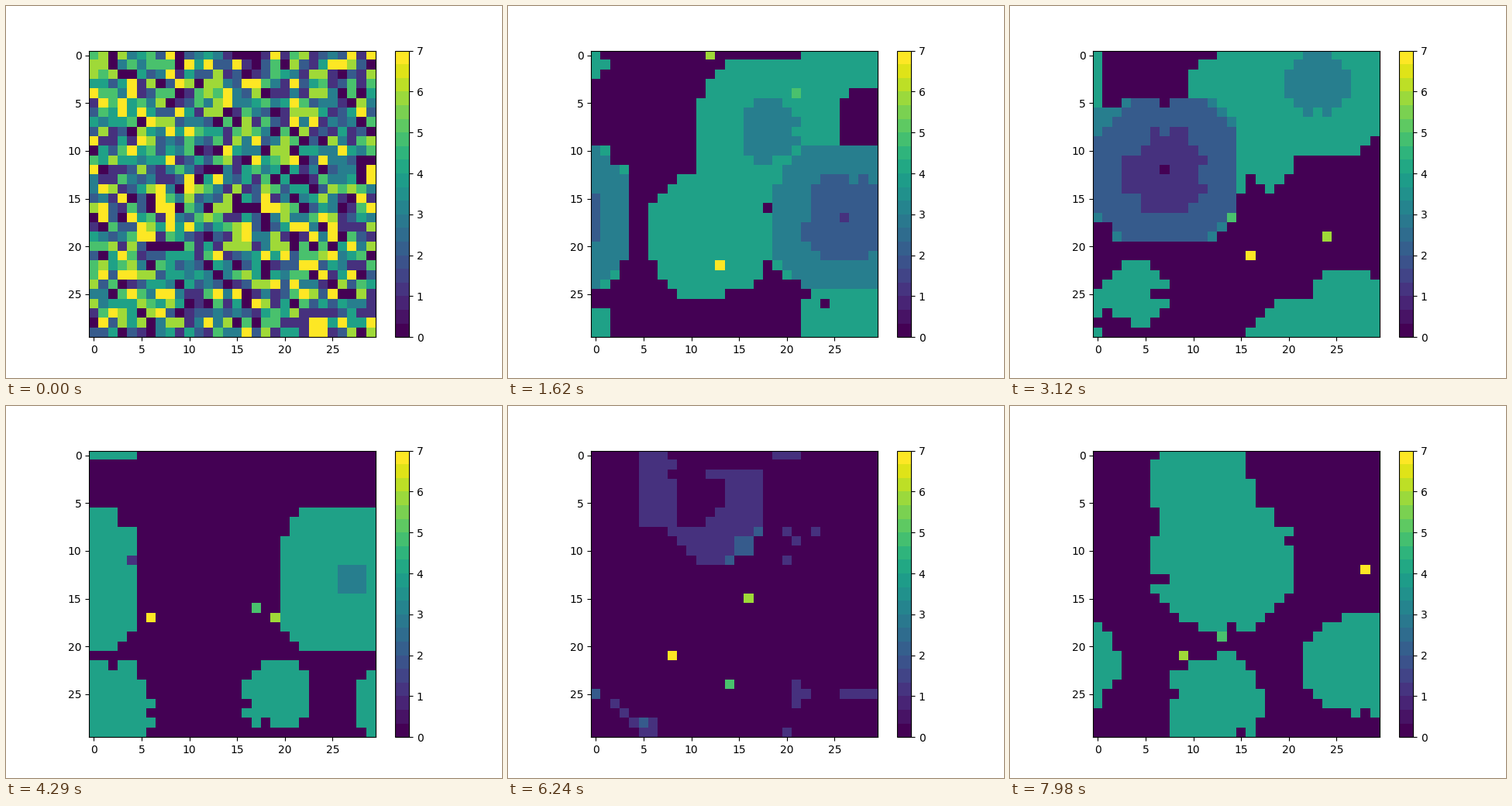
Recreate the animation shown at these times as a matplotlib script. Size 640 px wide and 480 px high, loop 8000 ms.

```python
import numpy as np
import matplotlib.pyplot as plt
from matplotlib.animation import FuncAnimation

SIZE = 30
STEPS = 267
LOOP_MS = 8000
LIFE = 20      # steps from ignition back to rest
REACH = 7      # how far a wave travels
CATCH = 0.92   # chance that a resting cell is lit by its neighbour

# (step, row, column) of the ignitions that lead each cycle
IGNITIONS = [
    (38, 17, 26), (43, 8, 18), (48, 19, 12), (49, 29, 26),
    (84, 12, 7), (93, 3, 23), (97, 7, 15), (99, 27, 25), (101, 25, 4),
    (124, 11, 4), (134, 13, 27), (139, 26, 2), (140, 25, 19),
    (177, 15, 3), (179, 17, 26), (179, 24, 13), (180, 3, 27),
    (227, 15, 24), (228, 7, 7), (229, 14, 2), (229, 3, 20),
    (259, 11, 13), (261, 3, 11), (261, 22, 27), (261, 26, 12),
]
PEAKS = (0, 54, 104, 143, 184, 233)   # chance ignitions follow each peak
BURST = 7

SIDES = [(-1, 0), (1, 0), (0, -1), (0, 1)]
CORNERS = [(-1, -1), (-1, 1), (1, -1), (1, 1)]


def simulate():
    """Excitable medium on a torus: light up, stay at 4, then fade to 0."""
    rng = np.random.default_rng(5)
    soup = rng.integers(0, 8, (SIZE, SIZE))
    sparks = rng.integers(0, SIZE, (STEPS, 2))
    birth = np.full((SIZE, SIZE), -LIFE)
    fuel = np.zeros((SIZE, SIZE), int)
    lit = IGNITIONS + [(peak + rng.integers(1, 5), *rng.integers(0, SIZE, 2))
                       for peak in PEAKS for _ in range(BURST)]
    grids = []
    for step in range(STEPS):
        # diagonal spread on every second step gives octagonal fronts
        near = SIDES + CORNERS if step % 2 else SIDES
        age = step - birth
        heat = np.where(age <= 2, fuel, 0)
        spread = np.max([np.roll(heat, d, (0, 1)) for d in near], axis=0) - 1
        new = (spread > 0) & (age >= LIFE) & (rng.random(age.shape) < CATCH)
        birth[new] = step
        fuel[new] = spread[new]
        for when, row, col in lit:
            if when == step:
                birth[row, col] = step
                fuel[row, col] = REACH + 1

        level = np.clip(5 - (step - birth) // 4, 0, 4)
        grid = np.maximum(level, soup - step // 2)
        # lone sparks cool from 7 to 5
        for cooled in range(min(3, step)):
            grid[tuple(sparks[step - cooled])] = 7 - cooled
        grids.append(grid)
    return grids


grids = simulate()
fig, ax = plt.subplots(figsize=(6.4, 4.8), dpi=100)
image = ax.imshow(grids[0], cmap="viridis", vmin=0, vmax=7,
                  interpolation="nearest")
bands = plt.cm.ScalarMappable(plt.Normalize(0, 7),
                              plt.get_cmap("viridis").resampled(21))
fig.colorbar(bands, ax=ax)


def draw(step):
    image.set_data(grids[step])
    return [image]


anim = FuncAnimation(fig, draw, frames=STEPS, interval=LOOP_MS / STEPS,
                     repeat=True, repeat_delay=0, blit=False)
plt.show()
```
